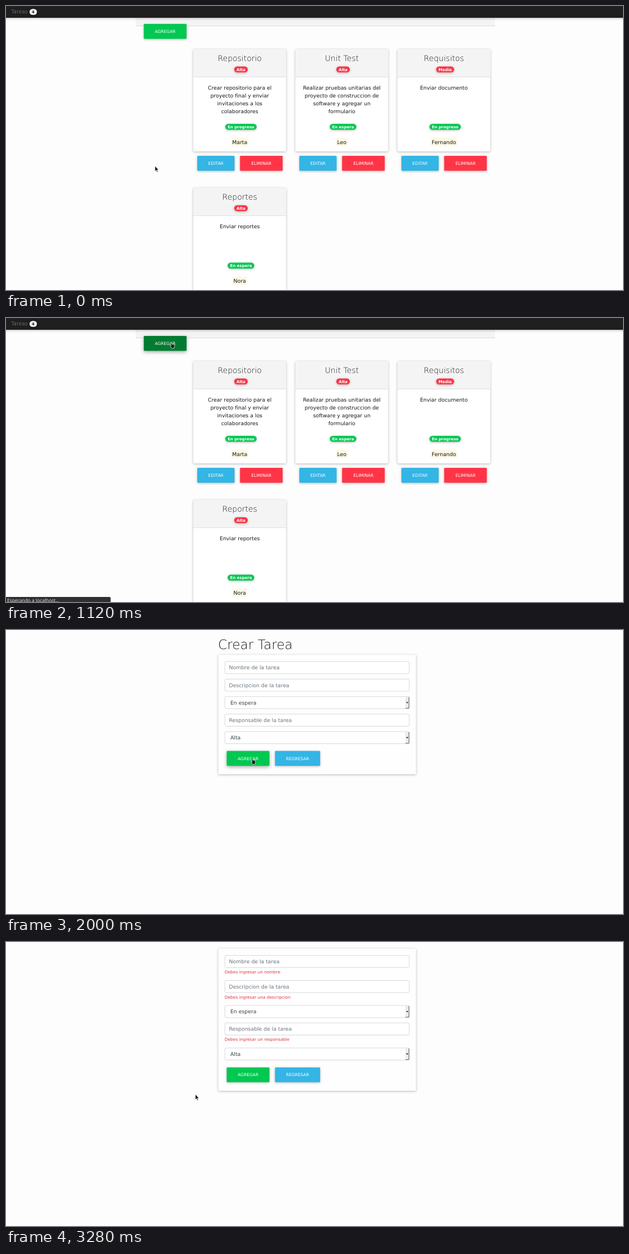
Write an HTML page that moves like this. It is 1100 by 506 pixels and loops after 4 s.

```html
<!DOCTYPE html>
<html lang="es">
<head>
<meta charset="utf-8">
<title>Tareas</title>
<style>
html, body { margin: 0; width: 100%; height: 100%; overflow: hidden; background: #fdfdfd; }
svg { display: block; width: 1100px; height: 506px; }
text { font-family: "DejaVu Sans", sans-serif; fill: #16191c; text-rendering: geometricPrecision; white-space: pre; }
.mid { text-anchor: middle; }
.thin { font-weight: 200; }
.bold { font-weight: bold; }
.white { fill: #fff; }
.hint { fill: #6c757d; }
.value { fill: #3c4248; }
.error { fill: #dc3545; }
.nav { fill: #a6a6a6; }
.status { font-family: "Noto Sans", sans-serif; fill: #dcdcdc; }
.raised { filter: drop-shadow(0 1.2px 1.9px rgba(0, 0, 0, .28)); }
.hover { filter: drop-shadow(0 2.6px 3.4px rgba(0, 0, 0, .36)); }
.bare .field-text { display: none; }
</style>
</head>
<body>
<svg viewBox="0 0 1100 506"></svg>
<script>
const GREEN = '#00c851', DARK_GREEN = '#007b30', BLUE = '#33b5e5', RED = '#ff3547';
const BASE = 9.31, SMALL = 6.98, BUTTON = 7.54;
const pen = document.createElement('canvas').getContext('2d');

function widthOf(string, size, weight = '') {
  pen.font = `${weight} 100px "DejaVu Sans", sans-serif`;
  return pen.measureText(string).width * size / 100;
}

// y is the middle of the capitals
const text = (x, y, string, size = BASE, cls = '') =>
  `<text x="${x}" y="${y + size * .3645}" font-size="${size}" class="${cls}">${string}</text>`;

const rect = (x, y, w, h, fill, rest = '') =>
  `<rect x="${x}" y="${y}" width="${w}" height="${h}" fill="${fill}" ${rest}/>`;

const button = (x, y, w, label, fill, cls = '') =>
  rect(x, y, w, 26.4, fill, `rx="1.2" class="raised ${cls}"`) +
  text(x + w / 2, y + 13.2, label, BUTTON, 'mid white field-text');

function badge(x, y, label, fill, cls = 'white') {
  const w = widthOf(label, SMALL, 'bold') + 1.2 * SMALL;
  return rect(x - w / 2, y - 5.25, w, 10.5, fill, 'rx="5.25" class="raised"') +
    text(x, y, label, SMALL, 'mid bold ' + cls);
}

function card(x, y, title, level, lines, state, person) {
  const mid = x + 82.7, mark = widthOf(person, BASE) + 4;
  return rect(x, y, 165.3, 182, '#fff', 'rx="2" class="raised"') +
    rect(x, y, 165.3, 49.5, '#f4f4f4', 'rx="2"') +
    rect(x, y + 49.2, 165.3, .7, '#d6d6d6') +
    text(mid, y + 16, title, 13.97, 'mid thin') +
    badge(mid + 2.2, y + 36, level, RED) +
    lines.map((line, i) => text(mid, y + 68.3 + i * 13.97, line, BASE, 'mid')).join('') +
    badge(mid + 2.2, y + 138.3, state, GREEN) +
    rect(mid - mark / 2, y + 158, mark, 14.5, '#fcf8e3') +
    text(mid, y + 165.3, person, BASE, 'mid') +
    button(x + 7, y + 190, 66.4, 'EDITAR', BLUE) +
    button(x + 83.2, y + 190, 76, 'ELIMINAR', RED);
}

const home =
  rect(231, 15, 641, 20.5, '#f4f4f4') + rect(231, 35.2, 641, .8, '#d6d6d6') +
  rect(-10, -10, 1120, 31, '#1f1f1f', 'class="raised"') +
  text(9.2, 10, 'Tareas', BASE, 'thin nav') +
  badge(48.5, 10.5, '4', '#f4f4f4', '') +
  button(245.7, 32, 76.2, 'AGREGAR', GREEN, 'add') +
  card(334, 77, 'Repositorio', 'Alta', ['Crear repositorio para el', 'proyecto final y enviar',
    'invitaciones a los', 'colaboradores'], 'En progreso', 'Marta') +
  card(516, 77, 'Unit Test', 'Alta', ['Realizar pruebas unitarias del', 'proyecto de construccion de',
    'software y agregar un', 'formulario'], 'En espera', 'Leo') +
  card(698, 77, 'Requisitos', 'Media', ['Enviar documento'], 'En progreso', 'Fernando') +
  card(334, 324.2, 'Reportes', 'Alta', ['Enviar reportes'], 'En espera', 'Nora');

const input = (y, label, cls = 'hint', x = 397.5) =>
  rect(390.3, y - 10.8, 328.6, 21.6, '#fff', 'rx="2.2" stroke="#c9ced3" stroke-width=".8"') +
  text(x, y, label, BASE, cls + ' field-text');

const select = (y, label) => input(y, label, 'value', 400) +
  rect(712, y - 10, 6.6, 20, '#ececec') +
  `<path d="M718.3 ${y - 10}v20h-6" fill="none" stroke="#555" stroke-width=".9"/>` +
  `<path d="M713.2 ${y - 1}h4l-2 2.4z" fill="#111"/>`;

const panel = (top, bottom, rows, buttons) =>
  rect(378.5, top, 352.3, bottom - top, '#fefefe', 'rx="1.5" class="raised"') +
  input(rows[0], 'Nombre de la tarea') +
  input(rows[1], 'Descripcion de la tarea') +
  select(rows[2], 'En espera') +
  input(rows[3], 'Responsable de la tarea') +
  select(rows[4], 'Alta') +
  button(393.5, buttons, 76.2, 'AGREGAR', GREEN, 'add') +
  button(479.6, buttons, 80.4, 'REGRESAR', BLUE);

const form = text(378, 25.7, 'Crear Tarea', 23.28, 'thin') +
  panel(44.3, 257, [67, 98.2, 129.4, 160.6, 191.8], 215.6);

const invalid = panel(12, 265, [34.8, 79.3, 123.9, 155, 199.6], 223.4) +
  text(389.8, 53.6, 'Debes ingresar un nombre', 7.45, 'error') +
  text(389.8, 98.1, 'Debes ingresar una descripcion', 7.45, 'error') +
  text(389.8, 173.7, 'Debes ingresar un responsable', 7.45, 'error');

const svg = document.querySelector('svg');
svg.innerHTML = [home, form, invalid].map(s => `<g class="scene">${s}</g>`).join('') +
  `<g id="status">${rect(-3, 497, 189.5, 15, '#303032', 'rx="2"')}
    ${text(2, 503.4, 'Esperando a localhost…', 8.4, 'status')}</g>
  <g id="cursor" fill="#1a1a1a" stroke="#fff" stroke-width=".7" stroke-linejoin="round">
    <path id="arrow" d="M0 0V9.6L2.2 7.6 3.7 11.2 5.3 10.5 3.8 7.1H6.8Z"/>
    <path id="hand" d="M.3 1Q1.2-.5 2.2.8L3.4 3.6 5 3.5 6.6 4.2 7.6 5.4V8.2L6.8 10.8H3L.4 7.6Q-.2 6.2 1.9 6.6Z"/>
  </g>`;

const find = id => document.getElementById(id);
const scenes = [...document.querySelectorAll('.scene')];
const [status, cursor, arrow, hand] = ['status', 'cursor', 'arrow', 'hand'].map(find);
const show = (node, on) => { node.style.display = on ? '' : 'none'; };
const within = (t, from, to) => t >= from && t < to;

// time, x, y
const path = [
  [0, 265.5, 285], [360, 265.5, 285], [780, 293, 43.2], [1230, 292.5, 43.2], [1430, 384, 172],
  [1720, 397, 199], [1900, 437, 228.5], [2640, 437, 228.5], [3280, 337.5, 271.3], [4000, 337.5, 271.3]
];

function pointer(t) {
  const i = path.findIndex(p => p[0] > t);
  const [t0, x0, y0] = path[i - 1], [t1, x1, y1] = path[i];
  const u = (t - t0) / (t1 - t0), k = u * u * (3 - 2 * u);
  return [x0 + (x1 - x0) * k, y0 + (y1 - y0) * k];
}

function draw(t) {
  const current = t < 1160 ? 0 : t < 2540 ? 1 : 2;
  scenes.forEach((scene, i) => show(scene, i === current));
  svg.classList.toggle('bare', within(t, 1160, 1300));
  show(status, within(t, 1060, 1300) || within(t, 2440, 2540));

  const [x, y] = pointer(t), add = scenes[current].querySelector('.add');
  const left = +add.getAttribute('x'), top = +add.getAttribute('y');
  const over = within(x, left, left + 76.2) && within(y, top, top + 26.4);
  add.classList.toggle('hover', over);
  add.setAttribute('fill', within(t, 940, 1160) || within(t, 2240, 2540) ? DARK_GREEN : GREEN);
  show(arrow, !over);
  show(hand, over);
  cursor.setAttribute('transform', `translate(${x} ${y})`);
}

function loop() {
  draw(performance.now() % 4000);
  requestAnimationFrame(loop);
}
loop();
</script>
</body>
</html>
```
